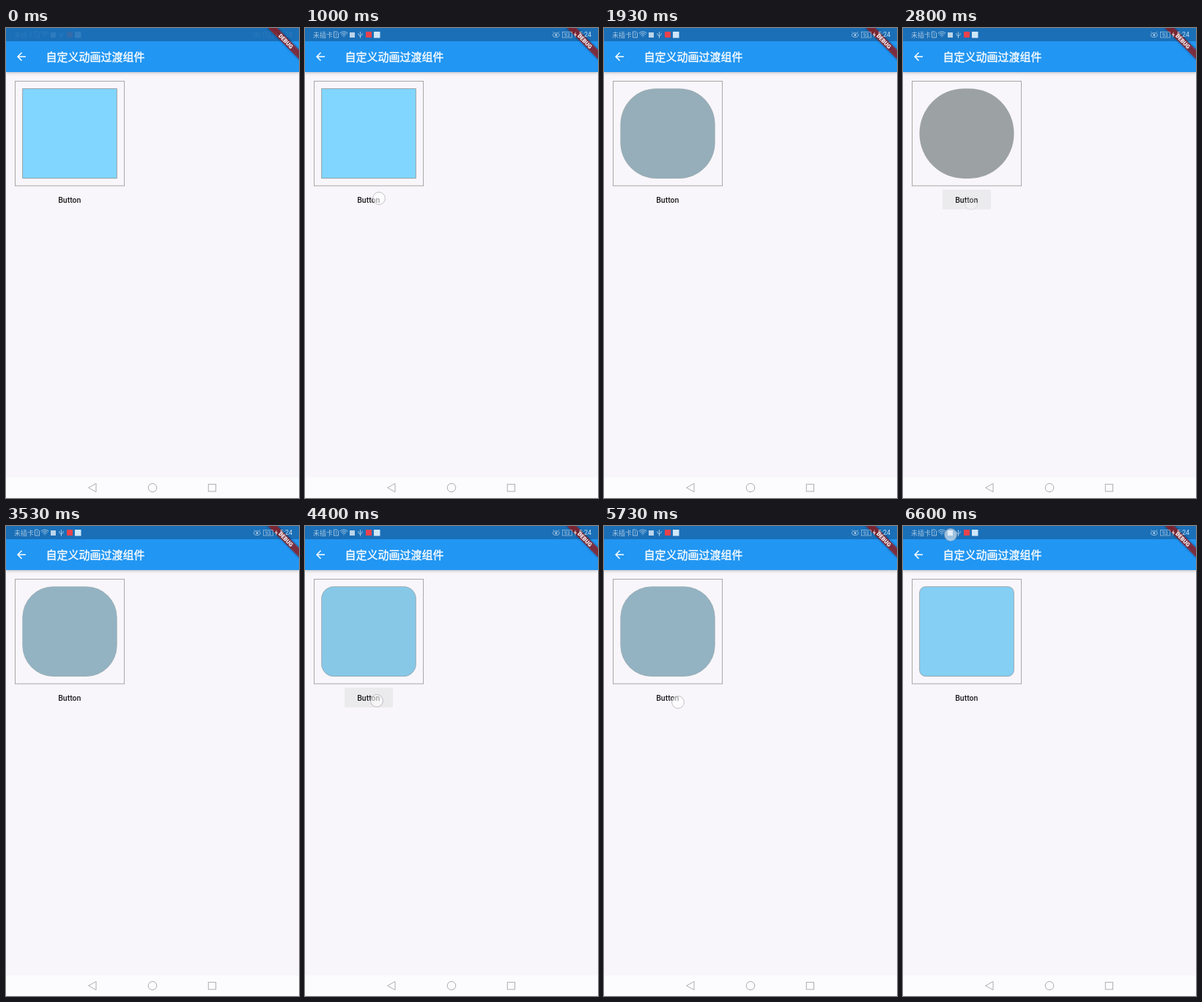
Animation, 400 px wide and 640 px high, one loop 6670 ms. Source, as an HTML page with a canvas:

```html
<!DOCTYPE html>
<html lang="zh-CN">
<head>
<meta charset="utf-8">
<title>自定义动画过渡组件</title>
<style>
html, body { margin: 0; width: 100%; height: 100%; overflow: hidden; background: #f8f6fa; }
canvas { display: block; width: 400px; height: 640px; }
</style>
</head>
<body>
<canvas id="stage" width="400" height="640"></canvas>
<script>
const ctx = document.getElementById('stage').getContext('2d');
const LOOP = 6670;
const CJK = '"Noto Sans CJK SC", "Noto Sans CJK", sans-serif';
const LATIN = 'Roboto, sans-serif';
const BLUE = [128, 214, 255], GREY = [158, 158, 158];

// Each release turns the morph around; speed is in full morphs per second.
const TAPS = [
  { x: 101, y: 232, down: 990, up: 1100, speed: .87 },
  { x: 93, y: 239, down: 2500, up: 2670, speed: .435 },
  { x: 98, y: 238, down: 4180, up: 4500, speed: .345 },
  { x: 101, y: 240, down: 5690, up: 5830, speed: .7 }
];
const LAST_TOUCH = { x: 65, y: 12, down: 6590, up: LOOP };

const clamp = v => Math.min(1, Math.max(0, v));
const mix = (a, b, k) => `rgb(${a.map((v, i) => Math.round(v + (b[i] - v) * k))})`;

function morph(t) {
  return TAPS.reduce((v, tap, i) => {
    const end = i + 1 < TAPS.length ? Math.min(t, TAPS[i + 1].up) : t;
    const step = tap.speed * Math.max(0, end - tap.up) / 1000;
    return clamp(v + (i % 2 ? -step : step));
  }, 0);
}

function pressed(t) {
  return Math.max(...TAPS.map(({ down, up }) =>
    Math.min(clamp((t - down - 100) / 120), clamp((up + 350 - t) / 200))));
}

function rect(x, y, w, h, color) {
  ctx.fillStyle = color;
  ctx.fillRect(x, y, w, h);
}

function text(str, x, y, font, color, align = 'left') {
  ctx.font = font;
  ctx.fillStyle = color;
  ctx.textAlign = align;
  ctx.fillText(str, x, y);
}

function line(d) {
  ctx.stroke(new Path2D(d));
}

function round(x, y, w, h, r) {
  ctx.beginPath();
  ctx.roundRect(x, y, w, h, r);
}

function disc(x, y, r) {
  ctx.beginPath();
  ctx.arc(x, y, r, 0, Math.PI * 2);
}

const ARROW = new Path2D('M20 11H7.83l5.59-5.59L12 4l-8 8 8 8 1.41-1.41L7.83 13H20v-2z');

function appBar() {
  ctx.save();
  ctx.shadowColor = 'rgba(0,0,0,.25)';
  ctx.shadowBlur = 4;
  ctx.shadowOffsetY = 1;
  rect(0, 0, 400, 60, '#2196f3');
  ctx.restore();
  rect(0, 0, 400, 18, '#1a6fb7');

  ctx.save();
  ctx.translate(12, 30);
  ctx.scale(.75, .75);
  ctx.fillStyle = '#fff';
  ctx.fill(ARROW);
  ctx.restore();

  // a hairline stroke gives the medium weight
  const title = '自定义动画过渡组件';
  text(title, 54.5, 45.3, '15px ' + CJK, '#fff');
  ctx.strokeStyle = '#fff';
  ctx.lineWidth = .35;
  ctx.strokeText(title, 54.5, 45.3);
}

function banner() {
  ctx.save();
  ctx.translate(400, 0);
  ctx.rotate(Math.PI / 4);
  ctx.filter = 'blur(1.5px)';
  rect(-32, 21, 64, 9, 'rgba(0,0,0,.5)');
  ctx.filter = 'none';
  rect(-32, 21, 64, 9, 'rgba(183,28,28,.63)');
  text('DEBUG', 0, 28.2, '900 7.65px ' + LATIN, '#fff', 'center');
  ctx.restore();
}

function statusBar(alpha) {
  const pale = 'rgba(255,255,255,.62)';
  ctx.save();
  ctx.globalAlpha = alpha;
  ctx.strokeStyle = pale;
  ctx.lineWidth = .9;
  text('未插卡', 11, 12.6, '9px ' + CJK, pale);

  // card slot
  line('M39.5 5h4l2 2v6h-6zM42.5 7v2.6M42.5 10.4v1');

  // wifi
  for (let r = 1; r < 8; r += 2.2) {
    ctx.beginPath();
    ctx.arc(53, 12.6, r, -Math.PI * .75, -Math.PI * .25);
    ctx.stroke();
  }

  rect(61, 6, 7, 7, 'rgba(255,255,255,.7)');
  line('M75.5 5v9M73 7v2.5l2.5 1.7 2.5-2V7');
  rect(83, 5, 8, 8, '#e8424c');
  rect(94, 5, 8.5, 8.5, '#cfe7fa');

  // eye
  ctx.beginPath();
  ctx.ellipse(342.8, 9.6, 4.4, 2.8, 0, 0, Math.PI * 2);
  ctx.stroke();
  disc(342.8, 9.6, 1.5);
  ctx.fillStyle = pale;
  ctx.fill();
  line('M339.5 6.2l-1-1.2M346 6.2l1-1.2');

  // battery
  ctx.lineWidth = .7;
  ctx.strokeRect(351.5, 5.5, 13, 7.5);
  text('93', 357.7, 11.8, '7px ' + LATIN, pale, 'center');
  ctx.fillStyle = 'rgba(255,255,255,.8)';
  ctx.fill(new Path2D('M369.6 5l-2.6 4.8h1.8l-.8 3.6 3-5h-1.8z'));
  text('5:24', 391, 12.4, '9px ' + LATIN, 'rgba(255,255,255,.75)', 'right');
  ctx.restore();
}

function box(k) {
  ctx.lineWidth = .9;
  ctx.strokeStyle = '#9e9e9e';
  ctx.strokeRect(12.5, 72.4, 149.1, 142.5);

  const r = Math.min(67.5 * k, 61);
  ctx.fillStyle = mix(BLUE, GREY, k);
  round(22.5, 82.4, 129, 122.5, r);
  ctx.fill();
  ctx.strokeStyle = `rgba(158,158,158,${1 - k})`;
  round(22.6, 82.6, 128.8, 122, r);
  ctx.stroke();
}

function button(press) {
  ctx.fillStyle = `rgba(0,0,0,${.05 * press})`;
  round(54, 220, 66, 27, 1.5);
  ctx.fill();
  text('Button', 86.8, 237.6, '500 10.5px ' + LATIN, '#1e1e20', 'center');
}

function navBar() {
  rect(0, 612, 400, 28, '#fcfbfd');
  ctx.strokeStyle = '#aeadb1';
  ctx.lineWidth = 1;
  line('M112.7 626l10.3-5.8v11.6z');
  disc(200, 626, 5.8);
  ctx.stroke();
  ctx.strokeRect(276.3, 621.3, 10.2, 9.7);
}

function touch(t, { x, y, down, up }) {
  if (t < down) return;
  ctx.save();
  ctx.globalAlpha = clamp((up + 200 - t) / 200);
  disc(x, y, 8.4);
  ctx.fillStyle = 'rgba(255,255,255,.58)';
  ctx.fill();
  ctx.strokeStyle = 'rgba(160,156,164,.6)';
  ctx.lineWidth = 1;
  ctx.stroke();
  ctx.restore();
}

function draw(t) {
  rect(0, 0, 400, 640, '#f8f6fa');
  appBar();
  banner();
  statusBar(clamp(.12 + t / 530));
  box(morph(t));
  button(pressed(t));
  navBar();
  [...TAPS, LAST_TOUCH].forEach(tap => touch(t, tap));
}

let start = null;
function tick(now) {
  if (start === null) start = now;
  draw((now - start) % LOOP);
  requestAnimationFrame(tick);
}
draw(0);
requestAnimationFrame(tick);
</script>
</body>
</html>
```
